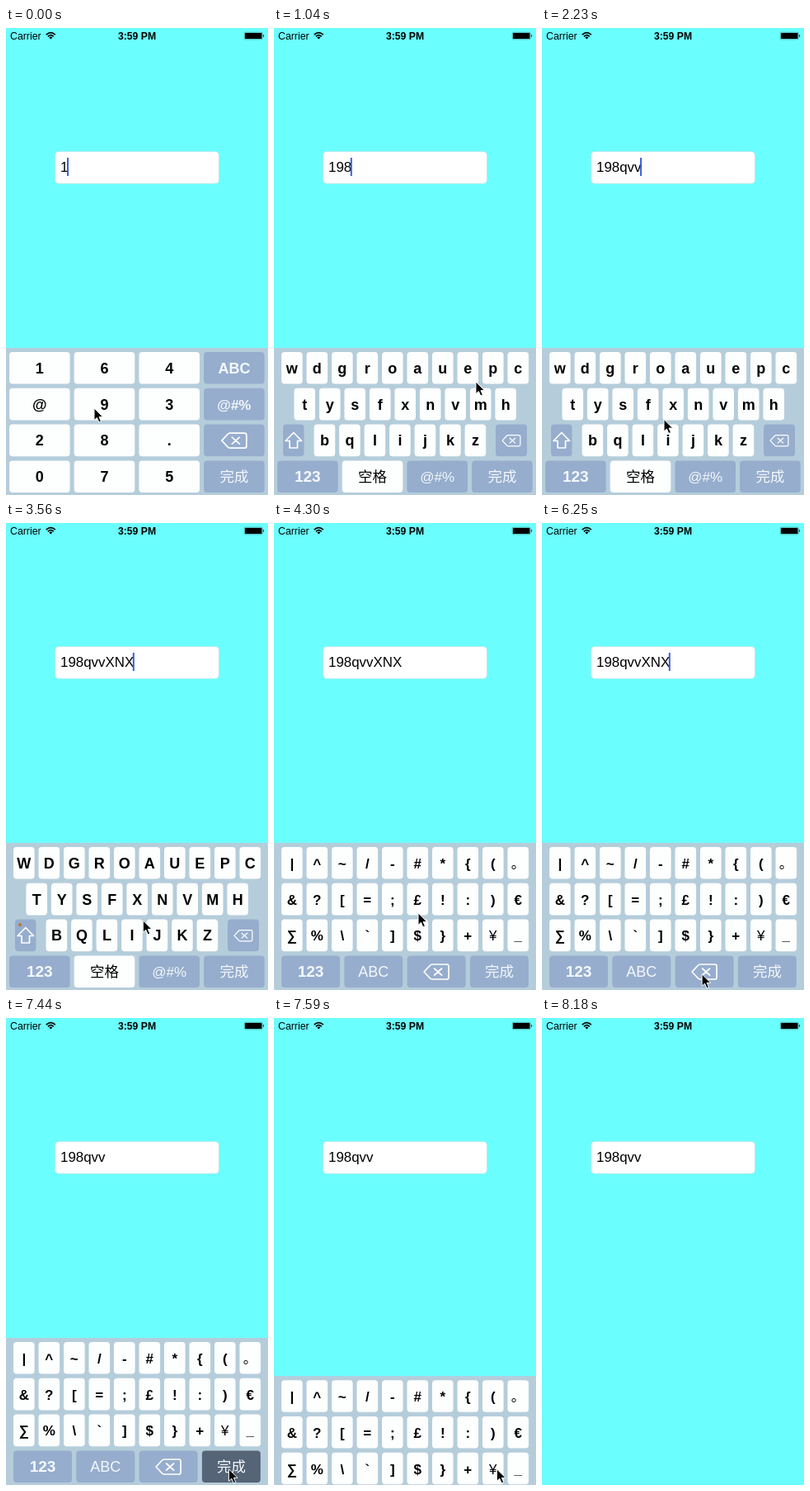
These frames come from a looping animation (318 px wide and 565 px high, 8790 ms). An HTML page:

```html
<!DOCTYPE html>
<html lang="en">
<head>
<meta charset="utf-8">
<title>Custom keyboards</title>
<style>
  html, body { margin: 0; width: 100%; height: 100%; overflow: hidden; background: #6bfefe; }
  svg { display: block; width: 318px; height: 565px; }
  text { font-family: "Liberation Sans", Arial, "Noto Sans CJK SC", "Noto Sans CJK", "Noto Sans CJK JP", sans-serif; white-space: pre; }
  .bold { font-weight: bold; }
  .mid { text-anchor: middle; }
  .icon { fill: none; stroke: #fff; stroke-width: 1.7; stroke-linejoin: round; stroke-linecap: round; }
</style>
</head>
<body>
<svg viewBox="0 0 318 565">
  <rect width="318" height="565" fill="#6bfefe"/>
  <text x="5" y="14" font-size="12.3">Carrier</text>
  <g fill="none" stroke="#000" stroke-width="1.7">
    <path d="M48.8 8.2Q54.3 3 59.8 8.2M50.9 10.3Q54.3 7 57.7 10.3"/>
    <path d="M52.3 11.4Q54.3 9.8 56.3 11.4L54.3 13.6Z" fill="#000" stroke="none"/>
  </g>
  <text class="bold mid" x="159" y="14" font-size="12.2">3:59 PM</text>
  <rect x="289.2" y="5.2" width="22" height="8.6" rx="1.6" fill="none" stroke="#000" stroke-width=".5" opacity=".6"/>
  <rect x="290" y="6" width="20.5" height="7" rx=".8"/>
  <path d="M312.3 7.6Q314.2 9.4 312.3 11.4Z"/>
  <rect x="59.5" y="149.5" width="199" height="38.7" rx="4.5" fill="#fff" stroke="#c8d4d4" stroke-width=".5"/>
  <text id="field" x="66" y="174" font-size="16.9"></text>
  <rect id="caret" y="157" width="2" height="22" fill="#3c60dc"/>
  <g id="board"><rect y="387" width="318" height="178" fill="#b5cddb"/></g>
  <path id="pointer" d="M0 0V14.6L3.4 11.5L5.8 17L8.4 15.9L6 10.6H10.6Z" fill="#000" stroke="#fff"/>
</svg>
<script>
const $ = id => document.getElementById(id);
const LOOP = 8790, STEP = 148.7, LEAD = 13;
const KEY_H = 38.6, BOARD_H = 178, SLIDE_STEPS = 3;
const WHITE = '#fdfefe', BLUE = '#96adcd', DARK = '#556476';
const rowY = row => 392 + row * 43.8;
const smooth = k => k * k * (3 - 2 * k);

function add(parent, tag, attrs, content) {
  const el = document.createElementNS('http://www.w3.org/2000/svg', tag);
  for (const name in attrs) el.setAttribute(name, attrs[name]);
  if (content) el.textContent = content;
  parent.append(el);
  return el;
}

function makeBoard() {
  const g = add($('board'), 'g');
  g.spots = {};
  return g;
}

// Draws a key and remembers its centre under its name.
function key(g, x, row, width, name, { label = name, fill = WHITE, size = 18, bold = true } = {}) {
  const y = rowY(row), cx = x + width / 2;
  const face = add(g, 'rect', { x, y, width, height: KEY_H, rx: 4, fill });
  add(g, 'text', {
    x: cx, y: y + 25.8, 'font-size': size,
    class: bold ? 'mid bold' : 'mid', fill: fill === WHITE ? '#000' : '#f4f8fc'
  }, label);
  g.spots[name] = [cx, y + KEY_H / 2];
  return face;
}

const blueKey = (g, x, row, width, name, size = 18, bold = false) =>
  key(g, x, row, width, name, { fill: BLUE, size, bold });

function keyRow(g, x, pitch, row, width, chars, size) {
  [...chars].forEach((ch, i) =>
    key(g, x + i * pitch, row, width, ch, { size, bold: !'。¥'.includes(ch) }));
}

function eraseKey(g, x, row, width, scale = 1) {
  key(g, x, row, width, 'erase', { label: '', fill: BLUE });
  const [cx, cy] = g.spots.erase;
  add(g, 'path', {
    class: 'icon', transform: `translate(${cx} ${cy + 0.3}) scale(${scale})`,
    d: 'M-15 0L-8 -7.5Q-6.8 -9 -5 -9H12.5Q15 -9 15 -6.5V6.5Q15 9 12.5 9H-5Q-6.8 9 -8 7.5ZM-2.5 -4L6.5 4M6.5 -4L-2.5 4'
  });
}

const quarter = i => 4 + i * 78.7;

function numberBoard() {
  const g = makeBoard();
  ['164', '@93', '28.', '075'].forEach((chars, row) => keyRow(g, 4, 78.7, row, 73.6, chars));
  blueKey(g, quarter(3), 0, 73.6, 'ABC', 18, true);
  blueKey(g, quarter(3), 1, 73.6, '@#%', 17, true);
  eraseKey(g, quarter(3), 2, 73.6);
  blueKey(g, quarter(3), 3, 73.6, '完成', 17.5);
  return g;
}

function letterBoard(upper) {
  const g = makeBoard();
  const starts = [9, 24.4, 48.6];
  ['wdgroauepc', 'tysfxnvmh', 'bqlijkz'].forEach((chars, row) =>
    keyRow(g, starts[row], 30.5, row, 25.6, upper ? chars.toUpperCase() : chars));
  key(g, 11, 2, 25.4, 'shift', { label: '', fill: BLUE });
  add(g, 'path', { class: 'icon', d: 'M23.8 489.5L33.5 499.5H28.5V508H19V499.5H14Z' });
  if (upper) add(g, 'circle', { cx: 17, cy: 486, r: 1.9, fill: '#c4702c' });
  eraseKey(g, 269, 2, 38, 0.73);
  blueKey(g, quarter(0), 3, 73.6, '123', 19, true);
  key(g, quarter(1), 3, 73.6, '空格', { size: 17.5, bold: false });
  blueKey(g, quarter(2), 3, 73.6, '@#%', 17);
  blueKey(g, quarter(3), 3, 73.6, '完成', 17.5);
  return g;
}

function symbolBoard() {
  const g = makeBoard();
  ['|^~/-#*{(。', '&?[=;£!:)€', '∑%\\`]$}+¥_'].forEach((chars, row) =>
    keyRow(g, 9, 30.5, row, 25.6, chars, 17));
  const col = i => 9 + i * 76.3;
  blueKey(g, col(0), 3, 71, '123', 19, true);
  blueKey(g, col(1), 3, 71, 'ABC');
  eraseKey(g, col(2), 3, 71);
  g.done = blueKey(g, col(3), 3, 71, '完成', 17.5);
  return g;
}

const boards = { '123': numberBoard(), ABC: letterBoard(false), shift: letterBoard(true), '@#%': symbolBoard() };

// The session as step:key; text, layout and pointer all follow from it.
const SCRIPT = '1:9 3:8 6:ABC 10:q 12:v 13:v 18:shift 20:X 21:N 23:X 26:@#% 30:£ 34:$ ' +
  '40:erase 41:erase 43:erase 44:erase 45:erase 50:完成';

const states = [{ step: 0, name: '1', text: '1', board: '123', spot: [107, 460] }];
for (const entry of SCRIPT.split(' ')) {
  const [step, name] = entry.split(':');
  let { text, board } = states.at(-1);
  const [x, y] = boards[board].spots[name];
  if (name in boards) board = name;
  else if (name === 'erase') text = text.slice(0, -1);
  else if (name !== '完成') text += name;
  states.push({ step: +step, name, text, board, spot: [x - 3, y + 3] });
}
const end = states.at(-1).step;

function pointAt(step, from, to) {
  const k = to ? smooth((step - from.step) / (to.step - from.step)) : 0;
  return from.spot.map((v, i) => v + ((to || from).spot[i] - v) * k);
}

function draw(step) {
  const i = states.findLastIndex(s => s.step <= step);
  const now = states[i];
  const field = $('field');
  field.textContent = now.text;
  const blinkOn = (step - now.step) % 6 < 3;
  $('caret').setAttribute('x', 64.6 + field.getComputedTextLength());
  $('caret').setAttribute('opacity', blinkOn && step < end ? 1 : 0);
  for (const name in boards) boards[name].setAttribute('display', name === now.board ? 'inline' : 'none');
  boards['@#%'].done.setAttribute('fill', step === end ? DARK : BLUE);
  const away = Math.min(1, Math.max(0, (step - end) / SLIDE_STEPS));
  $('board').setAttribute('transform', `translate(0 ${smooth(away) * BOARD_H})`);
  $('pointer').setAttribute('transform', `translate(${pointAt(step, now, states[i + 1])})`);
  $('pointer').setAttribute('display', away < 1 ? 'inline' : 'none');
}

let shown = -1;
function tick() {
  const step = Math.floor((performance.now() % LOOP + LEAD) / STEP);
  if (step !== shown) draw(shown = step);
  requestAnimationFrame(tick);
}
tick();
</script>
</body>
</html>
```
